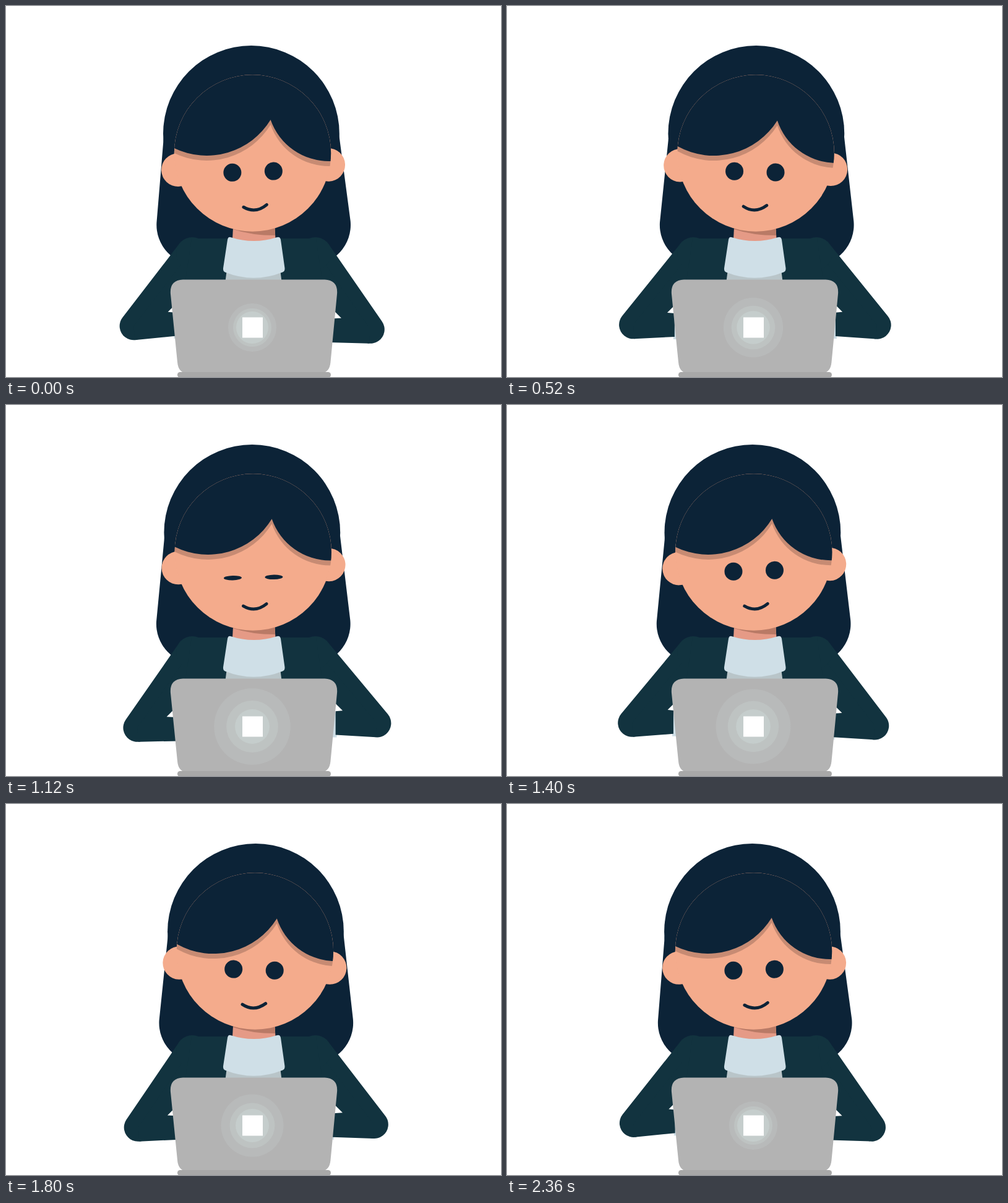
Animation, 800 px wide and 600 px high, one loop 2400 ms. Source, as an HTML page:

```html
<!DOCTYPE html>
<html lang="en">
<head>
<meta charset="utf-8">
<title>Typing at a laptop</title>
<style>
  html, body { margin: 0; width: 100%; height: 100%; overflow: hidden; background: #fff; }
  svg { display: block; width: 100vw; height: 100vh; }
  .hair { fill: #0c2337; }
  .skin { fill: #f4ab8c; }
  .jacket { fill: #12333f; }
  .shirt { fill: #cfdfe7; }
  .sleeve { fill: none; stroke: #12333f; stroke-width: 45.5; stroke-linecap: round; }
  .glow { fill: #d5e3e1; }
</style>
</head>
<body>
<svg viewBox="0 0 800 600">
  <clipPath id="faceClip"><circle id="face" cx="400.5" cy="238" r="126.7"/></clipPath>

  <path id="backHair" class="hair"/>
  <circle id="cap" class="hair" cy="206.5" r="142.4"/>

  <g id="leftArm"><path class="shirt"/><path class="sleeve"/><path class="jacket"/></g>
  <g id="rightArm" transform="translate(801) scale(-1 1)"><path class="shirt"/><path class="sleeve"/><path class="jacket"/></g>
  <g class="jacket">
    <circle cx="301" cy="400" r="26"/>
    <circle cx="500" cy="400" r="26"/>
    <path d="M300 376H501L515 470H286Z"/>
  </g>

  <path fill="#b9c5c9" d="M357 425H443L446 450H354Z"/>
  <path fill="#e59a86" d="M367.500 350H434L436 385H365.500Z"/>
  <path fill="#b97a66" d="M367.500 350H434L435 371Q396 371 367 361Z"/>
  <path class="shirt" d="M363 374Q400.500 386 438 374Q443 372.500 444 378L450.500 424Q451 429 447 430.500Q400.500 449 354 430.500Q350.500 429 351 424L358 378Q359 372.500 363 374Z"/>

  <g class="head skin">
    <circle cx="279" cy="261" r="26.8"/>
    <circle cx="522.500" cy="261" r="26.8"/>
  </g>
  <g clip-path="url(#faceClip)">
    <rect class="skin" x="260" y="100" width="280" height="280"/>
    <path id="fringeShadow" fill="#c78b73" transform="translate(0 8)"/>
    <path id="fringe" class="hair"/>
  </g>
  <g class="head">
    <ellipse class="eye hair" cx="366.800" rx="14.5"/>
    <ellipse class="eye hair" cx="433.300" rx="14.5"/>
    <path d="M383 324.700Q402 336.500 420.500 322" fill="none" stroke="#0c2337" stroke-width="5" stroke-linecap="round"/>
  </g>

  <path fill="#b3b3b3" d="M286 442.500H515Q537 443.500 535 466L524.500 576Q523 593.500 508 594H293Q278.500 593.500 277 576L266 466Q264 443.500 286 442.500Z"/>
  <rect x="277" y="592" width="248" height="9" rx="4.500" fill="#a8a8a8"/>
  <circle id="outerGlow" class="glow" cx="398" cy="520" opacity=".15"/>
  <circle id="midGlow" class="glow" cx="398" cy="520" opacity=".2"/>
  <circle id="innerGlow" class="glow" cx="398" cy="520" opacity=".3"/>
  <rect x="382" y="503.500" width="33" height="33" fill="#fff"/>
</svg>
<script>
const LOOP = 2400, TYPING = 800;
const $ = id => document.getElementById(id);
const all = selector => document.querySelectorAll(selector);
const set = (el, attrs) => { for (const name in attrs) el.setAttribute(name, attrs[name]); };
const wave = (t, period, peak) => Math.cos((t - peak) / period * 2 * Math.PI);

// Keys are [time, value]; each pair is joined by a sine ease.
const TILT = [[0, -1], [660, 1], [1310, -1], [1850, 1], [2400, -1]];
const SWAY = [[-440, 248.5], [200, 242], [700, 249], [1300, 241.5], [1960, 248.5], [2600, 242]];
const BLINK = [[0, 1], [1000, 1], [1130, 0.25], [1260, 1], [2400, 1]];

function ease(keys, t) {
  const i = keys.findIndex(key => key[0] > t);
  const [t0, v0] = keys[i - 1], [t1, v1] = keys[i];
  return v0 + (v1 - v0) * (1 - Math.cos(Math.PI * (t - t0) / (t1 - t0))) / 2;
}

function drawArm(group, elbowX, elbowY, innerX, innerY, cuffY) {
  const end = elbowX + 67;
  const [cuff, upper, fore] = group.children;
  set(cuff, { d: `M${end - 2} ${innerY + 4}h25V${cuffY + 4}h-25Z` });
  set(upper, { d: `M298.4 398L${elbowX} ${elbowY}` });
  set(fore, { d: `M${elbowX} ${elbowY}L${elbowX + 2} ${elbowY + 22.6}L${end} ${cuffY}V${innerY + 1}
    L${innerX} ${innerY}L345 ${innerY - 345 + innerX}L298.4 398Z` });
}

function drawHair(tilt, left) {
  const cx = 400 + 3.6 * tilt, right = left + 313.3;
  set($('cap'), { cx });
  set($('backHair'), { d: `M${cx - 141} 206L${left} 350A65 65 0 0 0 ${left + 65} 419
    H${right - 65}A65 65 0 0 0 ${right} 348L${cx + 141.5} 206Z` });
  const leftY = 228.5 - 1.5 * tilt;
  const d = `M240 90V${leftY - 14}L${274.5 + 2.5 * tilt} ${leftY}
    A121 121 0 0 0 ${432.8 + 5.2 * tilt} ${184.7 + 0.7 * tilt}
    A100 100 0 0 0 ${525.3 + 1.8 * tilt} ${252.5 + 1.5 * tilt}H560V90Z`;
  set($('fringe'), { d });
  set($('fringeShadow'), { d });
}

function draw(t) {
  const tilt = ease(TILT, t);
  drawHair(tilt, ease(SWAY, t));
  set($('face'), { cx: 400.5 + 2 * tilt });
  all('.head').forEach(el => set(el, { transform: `rotate(${1.95 * tilt} 400.5 296)` }));

  const ry = 14.5 * ease(BLINK, t);
  all('.eye').forEach(el => set(el, { ry, cy: 282.7 - ry }));

  const type = peak => wave(t, TYPING, peak);
  const l = type(230), r = type(-5), lFore = type(275), rFore = type(15);
  drawArm($('leftArm'), 207.7 + 5.9 * l, 518.6 + 4.6 * l,
    260.3 + 1.5 * type(60), 498.3 + 6.3 * lFore, 537.3 + 6.5 * lFore);
  drawArm($('rightArm'), 206.2 + 5.8 * r, 518.5 + 4.6 * r,
    258.3 - 1.5 * type(270), 498.7 + 6 * rFore, 538 + 6 * rFore);

  const glow = (1 - wave(t, LOOP, 0)) / 2;
  set($('outerGlow'), { r: 39 + 23 * glow });
  set($('midGlow'), { r: 31 + 11 * glow });
  set($('innerGlow'), { r: 26 + 2 * glow });
}

const start = performance.now();
function tick() {
  draw((performance.now() - start) % LOOP);
  requestAnimationFrame(tick);
}
tick();
</script>
</body>
</html>
```
